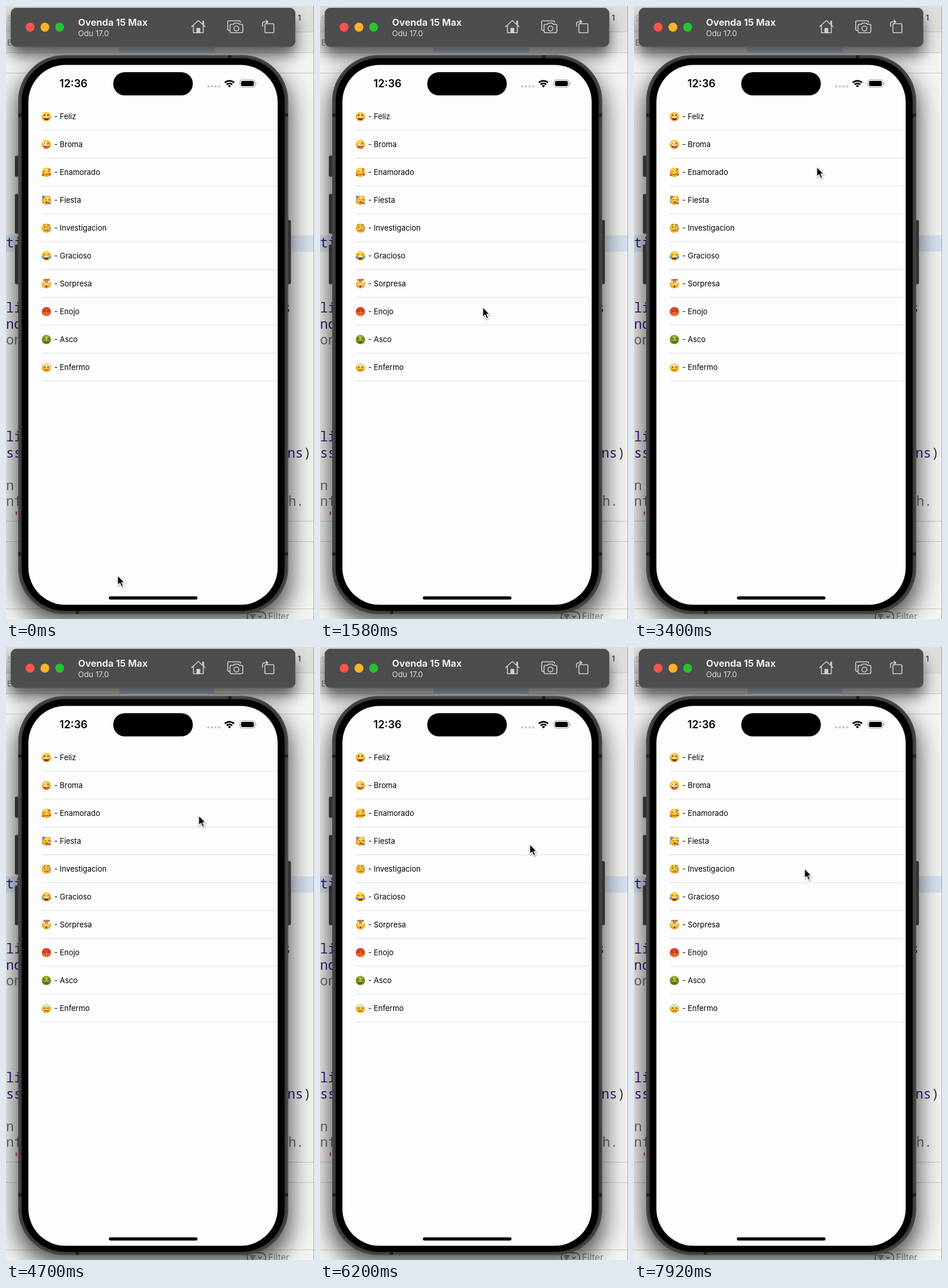
These frames come from a looping animation (530 px wide and 1056 px high, 8000 ms). An HTML page:

```html
<!DOCTYPE html>
<html lang="es">
<head>
<meta charset="utf-8">
<title>Lista de emociones</title>
<style>
  html, body { margin: 0; width: 100%; height: 100%; overflow: hidden; background: #f3f3f2; }
  svg { display: block; width: 530px; height: 1056px; }
  text { font-family: Inter, "Liberation Sans", sans-serif; white-space: pre; }
  .code text { font: 22.800px "Noto Sans Mono", "DejaVu Sans Mono", monospace; }
  .icon { fill: none; stroke: #d0d0d0; stroke-width: 1.6; stroke-linejoin: round; stroke-linecap: round; }
  .face { stroke-linecap: round; stroke-linejoin: round; }
  .ink { fill: none; stroke: #70400f; stroke-width: 1; }
</style>
</head>
<body>
<svg viewBox="0 0 530 1056">
  <defs>
    <filter id="blur" x="-30%" y="-30%" width="160%" height="160%"><feGaussianBlur stdDeviation="21"/></filter>
    <filter id="soft" x="-30%" y="-80%" width="160%" height="300%"><feGaussianBlur stdDeviation="13"/></filter>
    <filter id="tipShade" x="-50%" y="-50%" width="200%" height="200%">
      <feDropShadow dx="0.5" dy="1.5" stdDeviation="1.2" flood-opacity=".4"/>
    </filter>
    <radialGradient id="yellow" cy=".35"><stop offset=".3" stop-color="#ffdf4d"/><stop offset="1" stop-color="#f2a51e"/></radialGradient>
    <radialGradient id="red" cy=".8"><stop offset="0" stop-color="#f79a2e"/><stop offset="1" stop-color="#e0402a"/></radialGradient>
    <radialGradient id="green" cy=".35"><stop offset=".2" stop-color="#a9c63c"/><stop offset="1" stop-color="#62891f"/></radialGradient>
  </defs>

  <!-- editor window behind the device -->
  <rect width="530" height="1056" fill="#f3f3f2"/>
  <rect width="530" height="44" fill="#dededd"/>
  <rect y="44" width="530" height="36" fill="#e7e7e6"/>
  <rect x="195" y="44" width="164" height="36" fill="#c3cfe2"/>
  <rect y="395" width="530" height="28" fill="#d7e2f0"/>
  <path d="M0 44.5H530M0 80.5H530M0 115.5H530M0 887.5H530M0 922.5H530M0 1038.5H530" stroke="#c6c6c5"/>
  <g id="code" class="code"></g>
  <g fill="#777" font-size="13">
    <text x="2" y="26" fill="#aaa">S</text>
    <text x="2" y="68">E</text>
    <text x="502" y="25" fill="#444" font-weight="600">1</text>
    <text x="451" y="1057" font-size="15.500" fill="#888">Filter</text>
  </g>
  <g fill="none" stroke="#555" stroke-width="1.3">
    <rect x="415" y="1043.500" width="32" height="17" rx="8.500"/>
    <path d="M420 1049H429M421.500 1052H427.500M423 1055H426M434 1050.500L437 1053.500L440 1050.500"/>
  </g>

  <!-- shadows of device and toolbar -->
  <rect x="19" y="108" width="469" height="953" rx="70" filter="url(#blur)" opacity=".72"/>
  <rect x="8" y="20" width="490" height="66" rx="11" filter="url(#soft)" opacity=".62"/>

  <!-- device -->
  <g fill="#303031" stroke="#4a4a4b" stroke-width=".7">
    <rect x="15.500" y="258" width="8" height="36" rx="2"/>
    <rect x="15.500" y="324" width="8" height="68" rx="2"/>
    <rect x="15.500" y="411" width="8" height="68" rx="2"/>
    <rect x="482" y="369" width="8" height="110" rx="2"/>
  </g>
  <rect x="21" y="84.500" width="464.500" height="963" rx="79" fill="#3c3c3d"/>
  <rect x="22.500" y="86" width="461.500" height="960" rx="77.500" fill="none" stroke="#555556"/>
  <path d="M21 188H28M478 188H485M21 944H28M478 944H485M385 85V92M123 1040V1047" stroke="#202021" stroke-width="6"/>
  <rect x="27" y="90" width="452.500" height="952" rx="74"/>
  <rect x="38.500" y="101.500" width="429" height="930" rx="64" fill="#fdfdfd"/>
  <rect x="184.500" y="114" width="137" height="40" rx="20"/>
  <text x="92" y="140" font-size="18.300" font-weight="600">12:36</text>
  <path d="M348 138.500H368" stroke="#c3c3c3" stroke-width="4" stroke-linecap="round" stroke-dasharray="0 6.300"/>
  <g fill="none" stroke="#000" stroke-width="2.900">
    <path d="M376.500 132A11.700 11.700 0 0 1 392.500 132"/>
    <path d="M379.700 135.300A7 7 0 0 1 389.300 135.300"/>
  </g>
  <path d="M381.700 137.500A4 4 0 0 1 387.300 137.500L384.500 140.300Z"/>
  <rect x="402.500" y="127" width="26" height="13" rx="4" fill="none" stroke="#999"/>
  <rect x="404.500" y="129" width="22" height="9" rx="2.500"/>
  <path d="M430 131.500Q432.500 133.500 430 135.500Z" fill="#888"/>
  <g id="list"></g>
  <rect x="177" y="1017" width="152.500" height="5.500" rx="2.750"/>

  <!-- simulator toolbar -->
  <rect x="8" y="3" width="490" height="67.500" rx="10" fill="#4d4d4d"/>
  <rect x="8.500" y="3.500" width="489" height="66.500" rx="9.500" fill="none" stroke="#5d5d5d"/>
  <circle cx="41.500" cy="36.500" r="7.700" fill="#ff544d"/>
  <circle cx="67" cy="36.500" r="7.700" fill="#fdb42b"/>
  <circle cx="92.300" cy="36.500" r="7.700" fill="#29c232"/>
  <text x="124" y="34" font-size="16.200" font-weight="700" fill="#ededed">Ovenda 15 Max</text>
  <text x="124" y="52" font-size="13.300" fill="#dcdcdc">Odu 17.0</text>
  <g class="icon">
    <path d="M319.500 35.500L331 25L342.500 35.500M322.500 33.500V46H339.500V33.500M338.500 31V26H340V32.500"/>
    <path d="M328.500 46V38.500H333.500V46Z" fill="#d0d0d0"/>
    <path d="M385 42H383.500Q381.500 42 381.500 40V27.500Q381.500 25.500 383.500 25.500H401.500Q403.500 25.500 403.500 27.500V28"/>
    <path d="M388 31.500H391.500L393 29.500H400L401.500 31.500H405Q407.500 31.500 407.500 34V43.500Q407.500 46 405 46H388Q385.500 46 385.500 43.500V34Q385.500 31.500 388 31.500Z"/>
    <circle cx="396.500" cy="38.700" r="4.200"/>
    <rect x="445.500" y="30.500" width="15.500" height="15.500" rx="1.800"/>
    <path d="M441.500 35V30Q441.500 27.200 444.500 27.200H450M447.500 24.300L450.500 27.200L447.500 30"/>
  </g>
  <path d="M529.500 0V1056" stroke="#777" opacity=".6"/>

  <g id="cursor">
    <path d="M0 0V17.200L3.900 13.600L6.700 20L9.700 18.700L7 12.500H12.200Z" stroke="#fff" stroke-width="1.300" filter="url(#tipShade)"/>
  </g>
</svg>
<script>
const byId = id => document.getElementById(id);
const purple = '#361b83', gray = '#6a707a';

const code = [
  [0, 416, 'ti', purple], [0, 528, 'li', purple], [0, 556, 'nd', purple], [0, 583, 'on', gray],
  [0, 750, 'li', purple], [0, 778, 'ss', purple], [0, 834, 'n', gray], [0, 861, 'nf', gray],
  [13, 888, '"', '#b3241c'], [476, 528, 's', purple], [470.5, 778, 'ons', purple],
  [511.5, 778, ')', '#333'], [472, 861, 'th.', gray]
];
byId('code').innerHTML = code.map(([x, y, word, fill]) =>
  `<text x="${x}" y="${y}" fill="${fill}">${word}</text>`).join('');

// Face parts, drawn around (0, 0) with a radius of 8
const disc = (fill = 'yellow') => `<circle r="8" fill="url(#${fill})"/>`;
const dot = (x, y, r, fill = '#70400f') => `<circle cx="${x}" cy="${y}" r="${r}" fill="${fill}"/>`;
const ink = d => `<path class="ink" d="${d}"/>`;
const shape = (d, fill) => `<path d="${d}" fill="${fill}"/>`;
const eyes = (y = -2, r = 1.2) => dot(-2.8, y, r) + dot(2.8, y, r);
const grin = shape('M-5 1H5Q4.500 6 0 6T-5 1Z', '#63230f') + shape('M-4.700 1H4.700L4 2.700H-4Z', '#fff');
const heart = (x, y) => shape(`M${x} ${y + 2}l-2 -2.200q0 -2 2 -.8q2 -1.200 2 .8z`, '#e5302e');

const rows = [
  ['Feliz', disc() + eyes(-2.5, 1.4) + grin],
  ['Broma', disc() + dot(-3, -2, 2.3, '#fff') + dot(-3, -2, 1) + ink('M1.500 -3L4.500 -2L1.500 -.8') +
    grin + shape('M-2 3H2.500V6Q0 8.500 -2 6Z', '#ef5268')],
  ['Enamorado', disc() + ink('M-4.500 -1.500Q-3 -3.500 -1.500 -1.500M1.500 -1.500Q3 -3.500 4.500 -1.500M-3 3Q0 5.500 3 3') +
    dot(-5, 1.5, 1.5, '#f5843c') + dot(5, 1.5, 1.5, '#f5843c') + heart(-6, 5) + heart(6, 4) + heart(5, -5)],
  ['Fiesta', disc() + shape('M-8 -8L-1 -6.500L-6 -1Z', '#7a78c8') + ink('M-3 -.5Q-1.500 -2.500 0 -.5M2.500 -.5Q4 -2.500 5.500 -.5') +
    dot(0, 3.5, 1.5) + shape('M1 3L8 5L7.500 7.500L1 5Z', '#8b56c4') + dot(6, -6, 1, '#e24a3d') +
    dot(-7, 4, 1, '#4b9bd6') + dot(7, -1, 1, '#54ad48')],
  ['Investigacion', disc() + eyes(-1.5) + ink('M-5 -5Q-3 -6.500 -1.500 -5M1.500 -5L5 -6M-2.500 4Q0 2.500 3 4') +
    '<circle cx="3.200" cy="-1.300" r="3" fill="#fff" fill-opacity=".35" stroke="#8a7a55" stroke-width=".8"/>' +
    '<path d="M6 0Q7.500 4 6 7" fill="none" stroke="#8a7a55" stroke-width=".7"/>'],
  ['Gracioso', disc() + ink('M-5 -2Q-3.500 -4 -1.500 -2M1.500 -2Q3.500 -4 5 -2') + grin +
    shape('M-5 -.5Q-9.500 1 -8 4.500Q-4.500 5 -5 -.5ZM5 -.5Q9.500 1 8 4.500Q4.500 5 5 -.5Z', '#43a9e8')],
  ['Sorpresa', disc() + shape('M-8 -2L-5 -4L-2 -2L1 -4L4 -2L8 -4V-8H-8Z', '#fdfdfd') +
    shape('M-3 -2L-2 -5Q-7 -5 -6 -7Q-3 -9.500 0 -8Q4 -10 6.500 -7Q7 -5 2 -5L3 -2Z', '#b77748') +
    shape('M-2 -2L0 -7L2 -2Z', '#ee823f') + dot(-3, .5, 1.6, '#fff') + dot(3, .5, 1.6, '#fff') +
    eyes(.5, .8) + dot(0, 4.5, 1.6)],
  ['Enojo', disc('red') + eyes(.5, 1) + ink('M-5 -2.200L-1.300 -.5M5 -2.200L1.300 -.5M-3 4.500Q0 2.500 3 4.500')],
  ['Asco', disc('green') + ink('M-5 -3L-2 -1.500L-5 -.5M5 -3L2 -1.500L5 -.5') +
    shape('M-4 2.500Q0 4.500 4 2.500Q4 5.500 0 5.500T-4 2.500Z', '#45601a')],
  ['Enfermo', disc() + shape('M-7.500 -3Q-5 -8 0 -8Q5 -8 7.500 -3L5 -2Q0 -5 -6 -2Z', '#e9e7df') +
    '<path d="M-6 -4Q0 -7 7 -3" fill="none" stroke="#bcb9ae" stroke-width=".7"/>' + eyes(-.5) + ink('M-3 4.500Q0 2.500 3 4.500')]
];
byId('list').innerHTML = rows.map(([name, face], i) => `
  <g transform="translate(0 ${48 * i})">
    <g class="face" transform="translate(69.500 190.500)">${face}</g>
    <text x="83" y="195" font-size="12.900">- ${name}</text>
    <path d="M61 214H467.500" stroke="#dfdfe2"/>
  </g>`).join('');

// Pointer path: time, x, y, easing towards the next point
const loop = 8000;
const path = [
  [0, 192, 981, 'linear'], [1580, 280, 519, 'ease-out'], [2560, 314.5, 279, 'linear'],
  [3400, 314.5, 277, 'ease-in-out'], [4700, 331.5, 290, 'linear'], [6200, 361, 339.5, 'ease-in-out'],
  [7920, 293.5, 381.5, 'linear'], [loop, 293.5, 381.5, 'linear']
];
byId('cursor').animate(path.map(([t, x, y, easing]) => ({
  offset: t / loop, transform: `translate(${x}px, ${y}px)`, easing
})), { duration: loop, iterations: Infinity });
</script>
</body>
</html>
```
